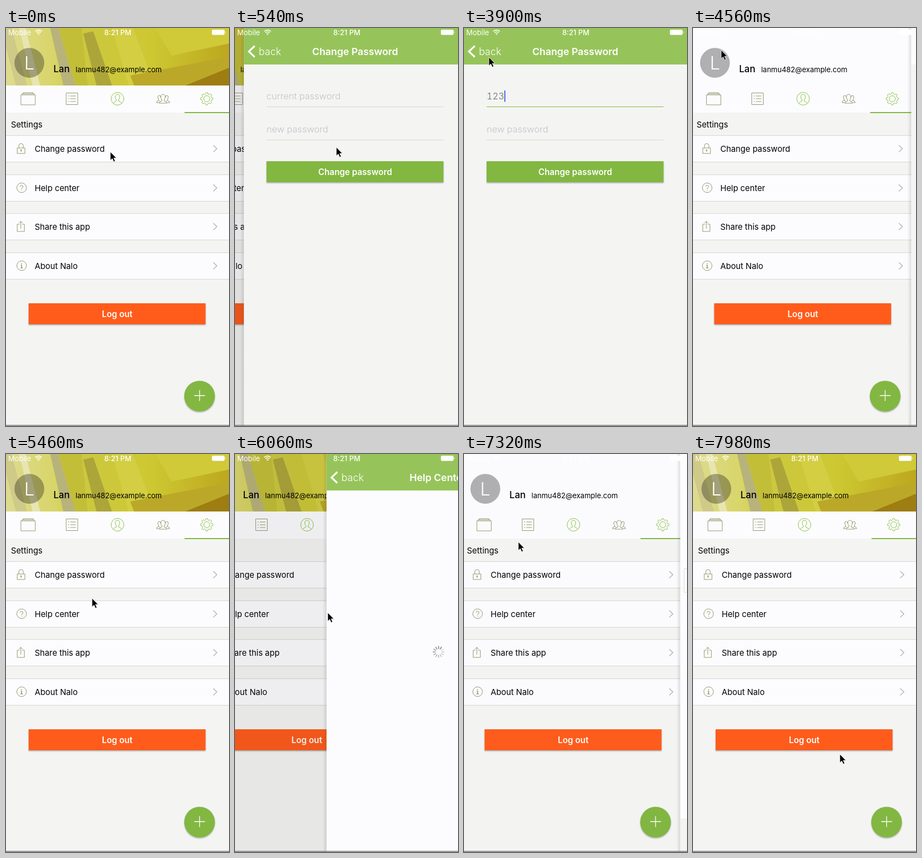
Animation of 404 by 720 pixels, one loop 8000 ms. Source, as an HTML page:

```html
<!DOCTYPE html>
<html lang="en">
<head>
<meta charset="utf-8">
<title>App settings</title>
<style>
  html, body { margin: 0; width: 100%; height: 100%; overflow: hidden; background: #f4f5f3; }
  svg { display: block; width: 404px; height: 720px; font: 14.8px Inter, sans-serif; }
  .white { fill: #fcfcfe; }
  .grey { fill: #f4f5f3; }
  .icon { fill: none; stroke: #94996f; stroke-width: 1; }
  .green { stroke: #8bc34a; }
  .mid { text-anchor: middle; }
  .bold { font-weight: 600; }
  .field { font-size: 16.5px; font-weight: 300; font-variant-numeric: tabular-nums; }
  .web { font: 14px "Liberation Sans", Arial, sans-serif; }
  .link { fill: #1414c4; }
</style>
</head>
<body>
<svg id="stage" viewBox="0 0 404 720">
  <defs>
    <linearGradient id="gold">
      <stop stop-color="#dedb90"/><stop offset=".22" stop-color="#d8d568"/>
      <stop offset=".34" stop-color="#ccc840"/><stop offset=".65" stop-color="#cdc832"/>
      <stop offset="1" stop-color="#bda71e"/>
    </linearGradient>
    <linearGradient id="edge">
      <stop stop-color="#555" stop-opacity="0"/><stop offset="1" stop-color="#555" stop-opacity=".18"/>
    </linearGradient>
    <filter id="drop" x="-20%" y="-20%" width="140%" height="150%">
      <feDropShadow dx="0" dy="1.5" stdDeviation="1.3" flood-color="#444" flood-opacity=".45"/>
    </filter>
    <clipPath id="heroClip"><path d="M0 0H404V104H0z"/></clipPath>
  </defs>

  <g id="settings"></g>
  <rect id="dim" width="404" height="720"/>
  <g id="change"></g>
  <g id="help"></g>

  <g fill="#fff" font-size="13">
    <text x="4" y="12.5">Mobile</text>
    <text x="202.5" y="12.5" class="mid" font-weight="500">8:21 PM</text>
    <g fill="none" stroke="#fff" stroke-width="1.6">
      <path d="M53 6.2Q59 .9 65 6.2M55.2 8.7Q59 5.3 62.8 8.7"/>
    </g>
    <path d="M57 10.2Q59 8.7 61 10.2L59 12.4z"/>
    <rect x="373" y="3" width="23" height="9.5" rx="2"/>
    <path d="M397 6q2 1.7 0 3.5z"/>
  </g>
  <path d="M0 718.7H404" stroke="#777" stroke-width="1.4"/>
  <path id="cursor" d="M0 0V15.5L3.6 12.2 6.2 18 8.8 16.8 6.2 11.2H11z" fill="#000" stroke="#fff" stroke-width=".8"/>
</svg>

<script>
const LOOP = 8000, WIDTH = 404;
const PUSH_CHANGE = 240, POP_CHANGE = 4215, PUSH_HELP = 5942, POP_HELP = 7000;
const HERO_DELAY = 540, FOCUS = 1530, HELP_LOADED = 6500;
const KEY_TIMES = [2100, 2340, 2580];
const GREEN = '#82b743', ORANGE = '#ff5c1c';
const CURSOR_PATH = [
  [0, 189, 224], [360, 189, 224], [1400, 121, 122], [2950, 121, 122],
  [3780, 45, 53], [4220, 45, 52], [4560, 51, 40], [4760, 55, 45],
  [5640, 168, 287], [6120, 168, 287], [6740, 49, 46], [7080, 49, 46], [7860, 266, 543]
];
const $ = id => document.getElementById(id);
const repeat = (count, draw) => Array.from({ length: count }, (_, i) => draw(i)).join('');

// Icons are drawn around their own centre.
const gearPoints = repeat(48, i => {
  const angle = i / 48 * Math.PI * 2, radius = 10 + 1.3 * Math.tanh(3 * Math.cos(angle * 8));
  return `${radius * Math.cos(angle)},${radius * Math.sin(angle)} `;
});
const person = 'M-7 8Q-6 5-2 4V2Q-4 0-4-3Q-4-8 0-8T4-3Q4 0 2 2V4Q6 5 7 8';
const tabIcons = [
  '<path d="M-13-7H13V11H-13zM-11-7V-9H11V-7M-9-9V-11H9V-9"/>',
  '<path d="M-10.5-10.5H10.5V10.5H-10.5zM-3-5H7M-3 0H7M-3 5H7M-7-5H-5M-7 0H-5M-7 5H-5"/>',
  `<circle r="11.5"/><path d="${person}"/>`,
  `<path d="${person}"/><path d="M-5 5Q-7 4-8 3V1Q-9.5-1-9.5-3Q-9.5-6-7-6T-4.5-3M-8 3Q-12 4-12 7H-7M5 5Q7 4 8 3V1Q9.5-1 9.5-3Q9.5-6 7-6T4.5-3M8 3Q12 4 12 7H7M-7 8H7"/>`,
  `<polygon points="${gearPoints}"/><circle r="5.5"/>`
];
const rows = [
  [194, 'Change password', '<path d="M-8-1H6V9H-8zM-5-1V-5Q-5-9-1-9T3-5V-1M-1 3V6"/><circle cx="-1" cy="3" r="1"/>'],
  [265, 'Help center', '<circle r="8.7"/><path d="M-2.5-2Q-2.5-4.5 0-4.5T2.5-2Q2.5-.5 0 1V2.5M0 4V5.2"/>'],
  [335, 'Share this app', '<path d="M-4-4H-8V9H5V-4H1M-1.5 4V-9M-5-6L-1.5-9.5 2-6"/>'],
  [406, 'About Nalo', '<circle r="8.7"/><path d="M-1.5-1H0V4M-2 4H2M0-4.5V-3" stroke-width="1.5"/>']
];

const button = (y, label, color) => `
  <rect x="41" y="${y}" width="320.5" height="38" fill="${color}" filter="url(#drop)"/>
  <text x="201.5" y="${y + 24.5}" class="mid bold" font-size="15.3" fill="#fff">${label}</text>`;

const navBar = title => `
  <rect class="white" width="404" height="66"/>
  <g class="nav">
    <rect width="404" height="66" fill="#96c45a"/>
    <path d="M19.5 32.5L9 42.5 19.5 52.5" fill="none" stroke="#fff" stroke-width="3.2"/>
    <text x="27" y="49" font-size="18" font-weight="300" fill="#fff">back</text>
    <text x="201.5" y="48.7" class="mid bold" font-size="17.8" fill="#fff">${title}</text>
  </g>`;

const pageEdge = '<rect x="-7" width="7" height="720" fill="url(#edge)"/>';

$('settings').innerHTML = `
  <rect class="grey" width="404" height="720"/>
  <rect class="white" x="-5" width="500" height="104"/>
  <g id="hero" clip-path="url(#heroClip)">
    <rect width="404" height="104" fill="url(#gold)"/>
    <path d="M0 0H10L38 104H18L0 36z" fill="#cfca88"/>
    <path d="M24 0H35L62 104H48z" fill="#e8e5b0"/>
    <path d="M80 0H95L126 104H104z" fill="#b8b37a"/>
    <path d="M95 0H137L148 104H126z" fill="#c3be38"/>
    <path d="M140 10L158 6 192 104H164z" fill="#aca53a"/>
    <path d="M192 0H230L270 104H222z" fill="#d3ce42"/>
    <path d="M225 86L404 52V104H232z" fill="#bba828"/>
    <path d="M270 0H404V28L300 50z" fill="#d0c938"/>
    <path d="M325 104L404 72V104z" fill="#9e7d12"/>
  </g>
  <circle cx="42.3" cy="63" r="27" fill-opacity=".3"/>
  <text x="42.3" y="75" class="mid" font-size="33" font-weight="300" fill="#fff">L</text>
  <text x="86" y="80" font-size="17" font-weight="500">Lan</text>
  <text x="126" y="80" font-size="13">lanmu482@example.com</text>
  <rect class="white" y="104" width="404" height="49"/>
  ${repeat(5, i => `<g class="icon ${i === 2 || i === 4 ? 'green' : ''}"
    transform="translate(${[40, 119.5, 202, 284.5, 363.7][i]} 128)">${tabIcons[i]}</g>`)}
  <rect x="323.5" y="152" width="80.5" height="2" fill="${GREEN}"/>
  <text x="9" y="179.5">Settings</text>
  ${rows.map(([y, label, icon]) => `
    <rect class="white" y="${y}" width="404" height="48.5"/>
    <path d="M0 ${y + .5}H404M0 ${y + 48.5}H404" stroke="#d6d6d4"/>
    <g class="icon" transform="translate(28.3 ${y + 24})">${icon}</g>
    <text x="52" y="${y + 30}">${label}</text>
    <path d="M375.5 ${y + 18}L382 ${y + 24.3} 375.5 ${y + 30.5}" fill="none" stroke="#bdbdba" stroke-width="1.7"/>`).join('')}
  ${button(498, 'Log out', ORANGE)}
  <circle cx="350.7" cy="666" r="27.8" fill="${GREEN}" filter="url(#drop)"/>
  <path d="M341 665H360.5M350.7 655.2V674.8" stroke="#fff" stroke-width="1.3"/>`;

$('change').innerHTML = `
  ${pageEdge}
  <rect class="grey" width="404" height="720"/>
  ${navBar('Change Password')}
  <text id="password" class="field" x="41" y="129"></text>
  <text class="field" x="41" y="188.7" fill="#c2c2c8">new password</text>
  <path d="M41 142.5H361.5M41 202.5H361.5" stroke="#d8d8d6"/>
  <path id="underline" stroke="${GREEN}" stroke-width="1.2"/>
  <rect id="caret" y="113" width="2" height="20.5" fill="#4a6fe0"/>
  ${button(241, 'Change password', GREEN)}`;

$('help').innerHTML = `
  ${pageEdge}
  <rect class="white" width="404" height="720"/>
  ${navBar('Help Center')}
  <g id="spinner" transform="translate(203 358)" stroke="#8c8c88" stroke-width="1.8" stroke-linecap="round">
    ${repeat(12, i => `<path d="M0-6V-10" transform="rotate(${i * 30})"/>`)}
  </g>
  <g id="site" class="web">
    <circle cx="200.5" cy="147" r="27" fill="#4285f4"/>
    <rect x="7" y="207.5" width="389" height="42.5" fill="#fcfcfe" stroke="#dddfd0"/>
    <rect x="355" y="207" width="41.5" height="43.5" rx="1.5" fill="#4688f1"/>
    <path d="M377 230L383.5 236.5" stroke="#fff" stroke-width="2.6"/>
    <circle cx="373.5" cy="226.5" r="5" fill="none" stroke="#fff" stroke-width="2.1"/>
    <text x="98" y="297.3">Tavuro.ca offered in:</text>
    <text x="242" y="297.3" class="link">Français</text>
    <rect y="659" width="404" height="61" fill="#f3f4f2"/>
    <circle cx="96.7" cy="688.8" r="5.3" fill="#999"/>
    <text x="106" y="694" font-weight="bold" fill="#333">Unknown</text>
    <text x="174" y="694">-</text>
    <text x="183" y="694" class="link">Use precise location</text>
  </g>`;

const clamp = v => Math.max(0, Math.min(1, v));
const ease = v => v * v * (3 - 2 * v);
const show = (element, visible) => { element.style.display = visible ? '' : 'none'; };

// Critically damped spring: fraction of the distance still to travel.
const remaining = t => (1 + t / 60) * Math.exp(-t / 60);
function pageX(t, push, pop) {
  if (t < push) return WIDTH;
  return WIDTH * (t < pop ? remaining(t - push) : 1 - remaining(t - pop));
}

function placePage(id, x, popping) {
  const page = $(id);
  show(page, x < WIDTH - .3);
  page.setAttribute('transform', `translate(${x} 0)`);
  show(page.querySelector('.nav'), !popping);
}

function cursorAt(t) {
  const next = CURSOR_PATH.findIndex(point => point[0] > t);
  if (next < 0) return CURSOR_PATH[CURSOR_PATH.length - 1].slice(1);
  const [t0, x0, y0] = CURSOR_PATH[next - 1], [t1, x1, y1] = CURSOR_PATH[next];
  const k = ease((t - t0) / (t1 - t0));
  return [x0 + (x1 - x0) * k, y0 + (y1 - y0) * k];
}

function drawPassword(t) {
  const typed = '123'.slice(0, KEY_TIMES.filter(key => t >= key).length);
  const text = $('password');
  text.textContent = typed || 'current password';
  text.setAttribute('fill', typed ? '#666' : '#c2c2c8');

  const half = 160.25 * ease(clamp((t - FOCUS) / 240));
  $('underline').setAttribute('d', `M${201.25 - half} 142.5H${201.25 + half}`);

  const lastKey = [FOCUS, ...KEY_TIMES].filter(key => t >= key).pop();
  show($('caret'), lastKey !== undefined && (t - lastKey) % 1000 < 500);
  $('caret').setAttribute('x', typed ? 41 + text.getComputedTextLength() : 41);
}

function draw(t) {
  const changeX = pageX(t, PUSH_CHANGE, POP_CHANGE);
  const helpX = pageX(t, PUSH_HELP, POP_HELP);
  const covered = 1 - Math.min(changeX, helpX) / WIDTH;
  const popping = [POP_CHANGE, POP_HELP].some(pop => t >= pop && t < pop + HERO_DELAY);

  $('settings').setAttribute('transform', `translate(${-.3 * WIDTH * covered} 0)`);
  show($('hero'), !popping);
  $('dim').setAttribute('opacity', .09 * covered);
  placePage('change', changeX, popping);
  placePage('help', helpX, popping);
  drawPassword(t);

  show($('site'), t >= HELP_LOADED);
  show($('spinner'), t < HELP_LOADED);
  const step = Math.floor(t / 83);
  [...$('spinner').children].forEach((tick, i) =>
    tick.setAttribute('opacity', 1 - ((step - i + 1200) % 12) * .065));

  $('cursor').setAttribute('transform', `translate(${cursorAt(t).join(' ')})`);
}

const start = performance.now();
function tick() {
  draw((performance.now() - start) % LOOP);
  requestAnimationFrame(tick);
}
tick();
</script>
</body>
</html>
```
